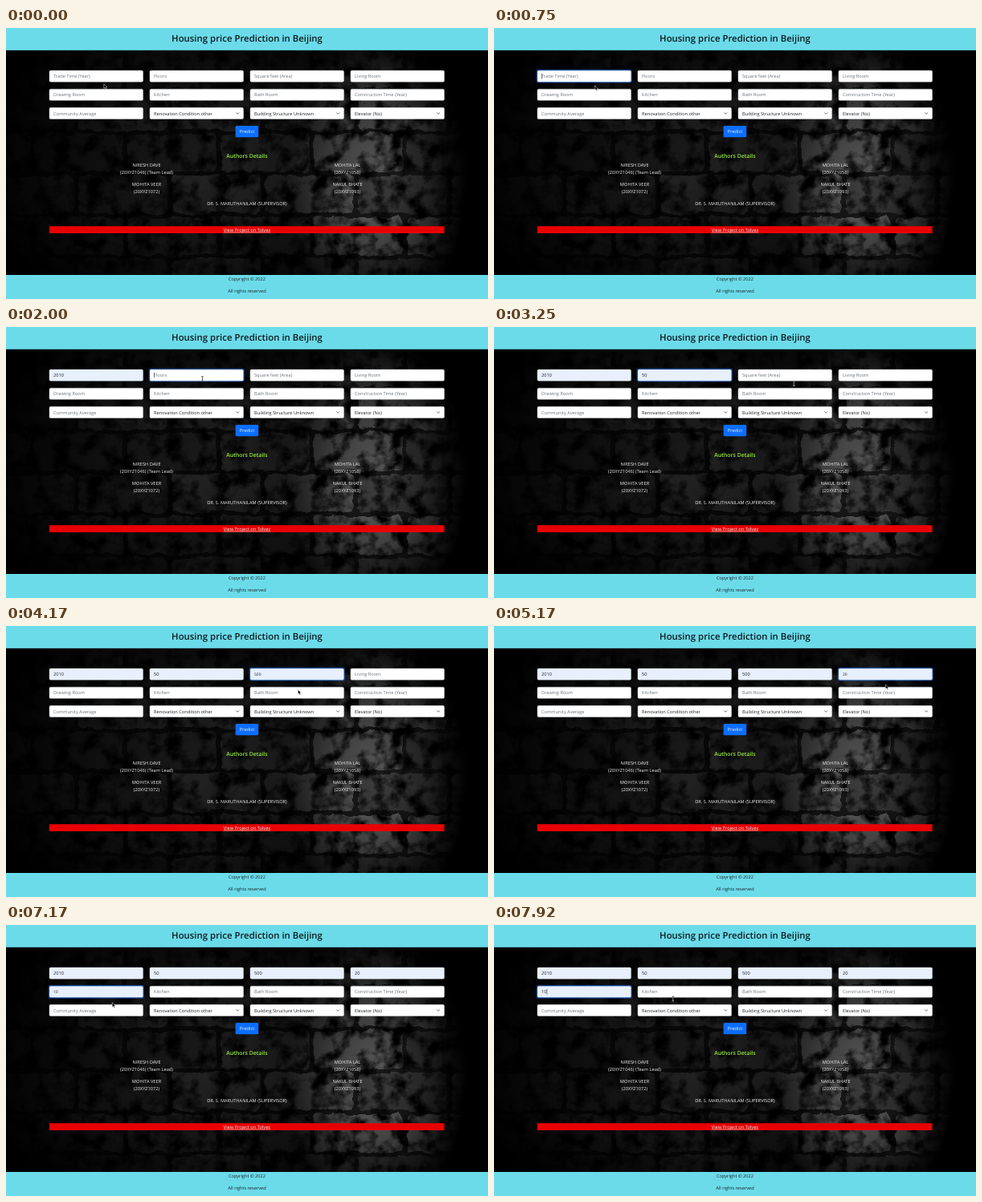
Animation, 600 px wide and 338 px high, one loop 8 s. Source, as an HTML page:

```html
<!DOCTYPE html>
<html lang="en">
<head>
<meta charset="utf-8">
<title>Housing price Prediction</title>
<style>
html, body { margin: 0; height: 100%; overflow: hidden; background: #000; }
svg { display: block; width: 100vw; height: 100vh; }
text { font: 5.68px "Open Sans", "Noto Sans", sans-serif; text-rendering: geometricPrecision; fill: #212529; }
.mid { text-anchor: middle; }
.light { fill: #f0f0f0; }
.hint { fill: #6c757d; }
.preview { font-size: 5px; }
.title { font-size: 11.4px; font-weight: 600; fill: #10191c; }
.sub { font-size: 6.9px; font-weight: 600; fill: #98ee3a; }
.beam { mix-blend-mode: difference; }
</style>
</head>
<body>
<svg viewBox="0 0 600 338" preserveAspectRatio="none">
  <defs>
    <filter id="stone" x="0" y="0" width="1" height="1" color-interpolation-filters="sRGB">
      <feTurbulence type="fractalNoise" baseFrequency=".05" numOctaves="5" seed="4" result="noise"/>
      <feDisplacementMap in="SourceGraphic" in2="noise" scale="10" xChannelSelector="R" yChannelSelector="G" result="wall"/>
      <feColorMatrix in="noise" values="3 0 0 0 -.8  3 0 0 0 -.8  3 0 0 0 -.8  0 0 0 0 1"/>
      <feBlend in2="wall" mode="multiply"/>
    </filter>
    <radialGradient id="glow">
      <stop offset="0" stop-color="#fff"/>
      <stop offset=".5" stop-color="#fff" stop-opacity=".6"/>
      <stop offset="1" stop-color="#fff" stop-opacity="0"/>
    </radialGradient>
    <mask id="lamp">
      <ellipse cx="260" cy="170" rx="290" ry="220" fill="url(#glow)" opacity=".3"/>
      <ellipse cx="462" cy="190" rx="112" ry="180" fill="url(#glow)" opacity=".8"/>
    </mask>
  </defs>
  <rect width="600" height="338"/>
  <g mask="url(#lamp)"><g id="wall" filter="url(#stone)"><rect y="20" width="600" height="300" fill="#222"/></g></g>
  <g id="page"></g>
  <path id="arrow" d="M0 0V5.6L1.4 4.4 2.4 6.6 3.3 6.2 2.4 4.1H4.1Z" fill="#000" stroke="#fff" stroke-width=".45"/>
  <path id="beam" class="beam" d="M-1.3 -2.8H1.3M0 -2.8V2.8M-1.3 2.8H1.3" fill="none" stroke="#ddd" stroke-width=".7"/>
</svg>
<script>
const LOOP = 8000, STEP = 1000 / 12;
const $ = id => document.getElementById(id);
const page = $('page');

function add(parent, tag, attrs, content = '') {
  const el = document.createElementNS('http://www.w3.org/2000/svg', tag);
  set(el, attrs);
  el.textContent = content;
  return parent.appendChild(el);
}
function set(el, attrs) {
  for (const k in attrs) el.setAttribute(k, attrs[k]);
}
const box = (x, y, width, height, fill, more) => add(page, 'rect', { x, y, width, height, fill, ...more });
const text = (x, y, s, cls = '') => add(page, 'text', { x, y, class: cls }, s);
const clamp = v => Math.max(0, Math.min(1, v));

// Brick wall
let seed = 7;
const rnd = () => (seed = seed * 16807 % 2147483647) / 2147483647;
for (let row = 0; row < 6; row++)
  for (let x = row % 2 ? -30 : -85; x < 600; x += 116) {
    const g = 70 + rnd() * 55 | 0;
    add($('wall'), 'rect', { x: x + 5, y: 28 + row * 52, width: 110, height: 47, rx: 5, fill: `rgb(${g},${g},${g})` });
  }

// Page
const CYAN = '#6bdbea';
box(0, 0, 600, 27.8, CYAN);
box(0, 308, 600, 30, CYAN);
text(300, 17.4, 'Housing price Prediction in Beijing', 'mid title');
text(300, 315.1, 'Copyright © 2022', 'mid');
text(300, 330.1, 'All rights reserved', 'mid');
box(285.7, 122, 28.6, 14.3, '#0d6efd', { rx: 1.6 });
text(300, 131.2, 'Predict', 'mid light');
text(300, 161.6, 'Authors Details', 'mid sub');
function author(x, y, name, id) {
  text(x, y, name, 'mid light');
  text(x, y + 9, id, 'mid light');
}
author(175, 173, 'NIRESH DAVE', '(20XYZ1046) (Team Lead)');
author(175, 197, 'MOHITA VEER', '(20XYZ1072)');
author(425, 173, 'MOHITA LAL', '(20XYZ1058)');
author(425, 197, 'NAKUL BHATE', '(20XYZ1093)');
text(300, 221, 'DR. S. MARUTHANILAM (SUPERVISOR)', 'mid light');
box(54, 247.2, 491.6, 8.8, '#e80000');
set(text(300, 253.7, 'View Project on Tolvex', 'mid light'), { 'text-decoration': 'underline' });

// Form: the first five fields get filled in
const labels = ['Trade Time (Year)', 'Floors', 'Square feet (Area)', 'Living Room',
  'Drawing Room', 'Kitchen', 'Bath Room', 'Construction Time (Year)',
  'Community Average', 'Renovation Condition other', 'Building Structure Unknown', 'Elevator (No)'];
const fills = [
  { value: '2010', focus: 580, preview: 1160, commit: 1410 },
  { value: '50', focus: 1870, preview: 2490, commit: 2700 },
  { value: '500', focus: 3490, preview: 3740, commit: 4240 },
  { value: '20', focus: 4740, preview: 4990, commit: 5240 },
  { value: '10', focus: 6490, preview: 6990, commit: 7490 }
];
const fields = labels.map((label, i) => {
  const x = 54 + i % 4 * 125, y = 53 + (i >> 2) * 23.15, select = i > 8;
  const ring = box(x - 1.4, y - 1.4, 119.4, 17, '#0d6efd', { rx: 2.6, opacity: 0 });
  const rect = box(x, y, 116.6, 14.2, '#fff', { rx: 1.6, stroke: '#ced4da', 'stroke-width': .4 });
  const word = text(x + 5, y + 9.2, label, select ? '' : 'hint');
  const caret = box(x + 5, y + 3.6, .5, 7, '#111', { opacity: 0 });
  if (select) add(page, 'path', {
    d: `M${x + 107.4} ${y + 6.2}l1.8 1.8 1.8 -1.8`, fill: 'none', stroke: '#343a40', 'stroke-width': .75
  });
  return { x, label, ring, rect, word, caret };
});

function drawField(f, i, t) {
  const { value, focus, preview, commit } = fills[i];
  const blur = i < 4 ? fills[i + 1].focus : LOOP;
  const glow = clamp((t - focus) / 150) - clamp((t - blur) / 150);
  const filled = t >= preview, done = t >= commit;
  const blinkOn = (t - (done ? commit : focus)) % 1000 < 500;
  const active = t >= focus && t < blur && (done || !filled);
  set(f.ring, { opacity: .42 * glow });
  set(f.rect, { stroke: glow > .5 ? '#86b7fe' : '#ced4da', fill: filled ? '#e8f0fe' : '#fff' });
  f.word.textContent = filled ? value : f.label;
  set(f.word, { class: done ? '' : filled ? 'preview' : 'hint' });
  set(f.caret, {
    x: f.x + 5 + (done ? f.word.getComputedTextLength() + .2 : 0),
    opacity: active && blinkOn ? 1 : 0
  });
}

// Pointer stops: time, x, y
const stops = [
  [0, 121.8, 69.8], [500, 121, 62], [660, 121, 62], [750, 125.6, 72], [1000, 125.6, 72],
  [1500, 121, 76], [1667, 150, 70], [2000, 244.5, 64.5], [2417, 243, 63], [2833, 243, 77],
  [3250, 373.3, 70.5], [3500, 368, 62], [3833, 360, 80], [4417, 366, 79], [4500, 479, 64],
  [4740, 479, 64], [5167, 487.4, 73], [5500, 470, 76], [6000, 145, 86], [6500, 137.4, 86.5],
  [6833, 134, 95], [7583, 130, 99], [7917, 222.8, 92], [8100, 222.8, 92]
];

function drawPointer(t) {
  const i = stops.findIndex(s => s[0] > t);
  const [t0, x0, y0] = stops[i - 1], [t1, x1, y1] = stops[i];
  const k = (t - t0) / (t1 - t0);
  const transform = `translate(${x0 + (x1 - x0) * k} ${y0 + (y1 - y0) * k})`;
  // An arrow over the suggestions below a field, a beam elsewhere
  const arrow = t < 160 || fills.some(f => t > f.focus + 150 && t < f.commit + 100);
  set($('arrow'), { transform, visibility: arrow ? 'visible' : 'hidden' });
  set($('beam'), { transform, visibility: arrow ? 'hidden' : 'visible' });
}

function frame(now) {
  // The screen refreshes twelve times a second
  const t = Math.floor((now + 4) % LOOP / STEP) * STEP + .5;
  fills.forEach((_, i) => drawField(fields[i], i, t));
  drawPointer(t);
  requestAnimationFrame(frame);
}
requestAnimationFrame(frame);
</script>
</body>
</html>
```
